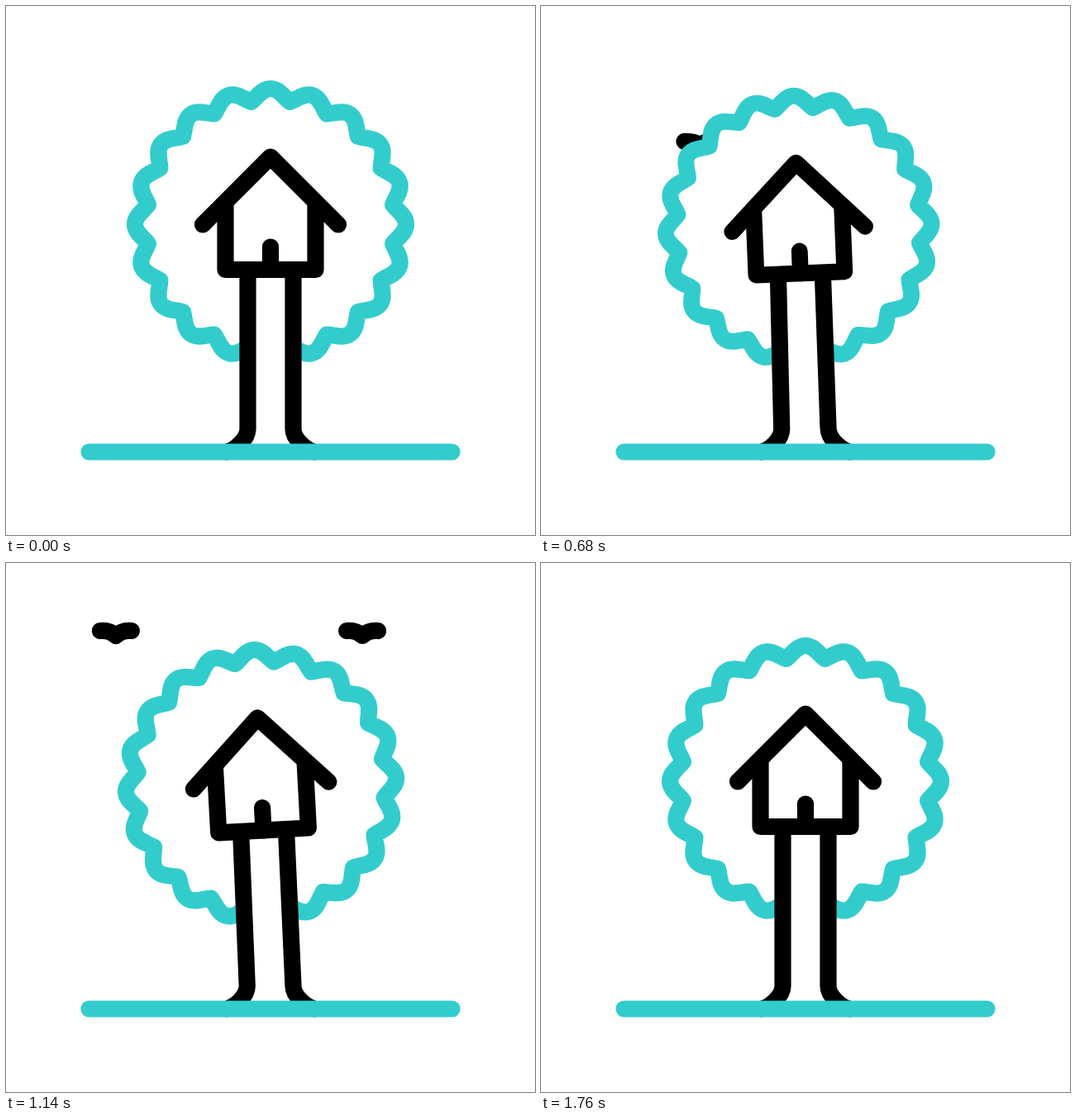
Animation of 640 by 640 pixels, one loop 1.9 s. Source, as an HTML page:

```html
<!DOCTYPE html>
<html lang="en">
<head>
<meta charset="utf-8">
<title>Tree house in the wind</title>
<style>
  html, body { margin: 0; width: 100%; height: 100%; overflow: hidden; background: #fff; }
  svg { display: block; width: 100%; height: 100%; }
  .line { fill: none; stroke: #000; stroke-width: 20.2; stroke-linejoin: round; }
  .round { stroke-linecap: round; }
  .teal { stroke: #33cccc; }
</style>
</head>
<body>
<svg viewBox="0 0 640 640">
  <path id="birdLeft" class="line round"/>
  <path id="birdRight" class="line round"/>
  <path id="crown" class="line teal" style="fill:#fff"/>
  <path id="trunks" class="line"/>
  <g id="house" class="line">
    <path d="M265.5 240V319H374.5V240"/>
    <path class="round" d="M238 264.5L320 182.5L402 264.5M320 291.5V319"/>
  </g>
  <path class="line round teal" d="M100.5 539.5H539.5"/>
</svg>
<script>
const LOOP = 1900;
const PIVOT = { x: 320, y: 476 };
const $ = id => document.getElementById(id);
const fix = n => n.toFixed(2);

// Sway keys: time, lean in degrees, vertical offset
const SWAY = [
  [0, 0, 0], [462, -15.1, -1.5], [862, 7.3, 3.5], [1200, -4, 4], [1620, 0, 0]
];

// Flight paths: time, x, y
const FLIGHT_LEFT = [[680, 192, 166], [920, 160, 129.5], [1140, 133, 85], [1520, 108.5, 2.5]];
const FLIGHT_RIGHT = [[920, 412, 135], [1140, 431, 85], [1520, 498.5, 12], [1740, 544, -9]];

function crownPath() {
  const at = (deg, r) => {
    const a = deg * Math.PI / 180;
    return fix(320 + r * Math.sin(a)) + ' ' + fix(264 - r * Math.cos(a));
  };
  const end = 169.5;
  let d = 'M' + at(-end, 152);
  for (let peak = -162; peak <= 162; peak += 18) {
    const last = peak === 162;
    d += `C${at(peak - 6, 154.5)} ${at(peak - 3.6, 164.3)} ${at(peak, 164)}`;
    d += `C${at(peak + 3.6, 164.3)} ${at(peak + 6, 154.5)} `;
    d += last ? at(end, 152) : at(peak + 9, 150);
  }
  return d;
}

// Matrix of the crown and house, followed by the trunk elbows: left x, left y, right y
function pose(deg, dy) {
  const a = deg * Math.PI / 180, c = Math.cos(a), s = Math.sin(a);
  const left = Math.min(0, s), right = Math.max(0, s);
  return [c, s, -s, c,
    PIVOT.x - c * PIVOT.x + s * PIVOT.y,
    PIVOT.y - s * PIVOT.x - c * PIVOT.y + dy,
    292.5 + 12 * left, 512 + 18 * left, 512 - 25 * right];
}

// Points travel in straight lines between poses, so the poses blend linearly
function swayPose(t) {
  const i = SWAY.findIndex(key => t < key[0]);
  if (i < 0) return pose(0, 0);
  const [t0, lean0, dy0] = SWAY[i - 1], [t1, lean1, dy1] = SWAY[i];
  const u = (t - t0) / (t1 - t0), p = u * u * (3 - 2 * u);
  const to = pose(lean1, dy1);
  return pose(lean0, dy0).map((v, k) => v + (to[k] - v) * p);
}

function trunkPath([a, b, c, d, e, f, leftX, leftY, rightY]) {
  const top = x => fix(a * x + c * 319 + e) + ' ' + fix(b * x + d * 319 + f);
  return `M265 539.5C275 539.5 292.5 524 ${fix(leftX)} ${fix(leftY)}L${top(292.5)}` +
    `M375 539.5C365 539.5 347.5 524 347.5 ${fix(rightY)}L${top(347.5)}`;
}

// Smooth curve through all keys (Lagrange)
function through(keys, column, t) {
  return keys.reduce((sum, key) => sum + keys.reduce(
    (w, other) => other === key ? w : w * (t - other[0]) / (key[0] - other[0]), key[column]), 0);
}

function drawBird(bird, flight, from, t) {
  const shown = t >= from && t < 1750;
  bird.style.display = shown ? '' : 'none';
  if (!shown) return;
  const x = through(flight, 1, t), y = through(flight, 2, t);
  const flap = Math.cos(Math.PI * (t - 1140) / 73.5);
  const half = 17 + 2 * flap, tip = y - 2.75 * flap, mid = y + 0.5 + 2.75 * flap;
  const bend = half * 0.4, arch = tip - flap;
  bird.setAttribute('d', `M${fix(x - half)} ${fix(tip)}` +
    `Q${fix(x - bend)} ${fix(arch)} ${fix(x)} ${fix(mid)}` +
    `Q${fix(x + bend)} ${fix(arch)} ${fix(x + half)} ${fix(tip)}`);
}

function draw(t) {
  const now = swayPose(t);
  const transform = `matrix(${now.slice(0, 6).map(v => v.toFixed(5)).join(' ')})`;
  $('crown').setAttribute('transform', transform);
  $('house').setAttribute('transform', transform);
  $('trunks').setAttribute('d', trunkPath(now));
  drawBird($('birdLeft'), FLIGHT_LEFT, 580, t);
  drawBird($('birdRight'), FLIGHT_RIGHT, 880, t);
}

$('crown').setAttribute('d', crownPath());
const start = performance.now();
function tick() {
  draw((performance.now() - start) % LOOP);
  requestAnimationFrame(tick);
}
tick();
</script>
</body>
</html>
```
